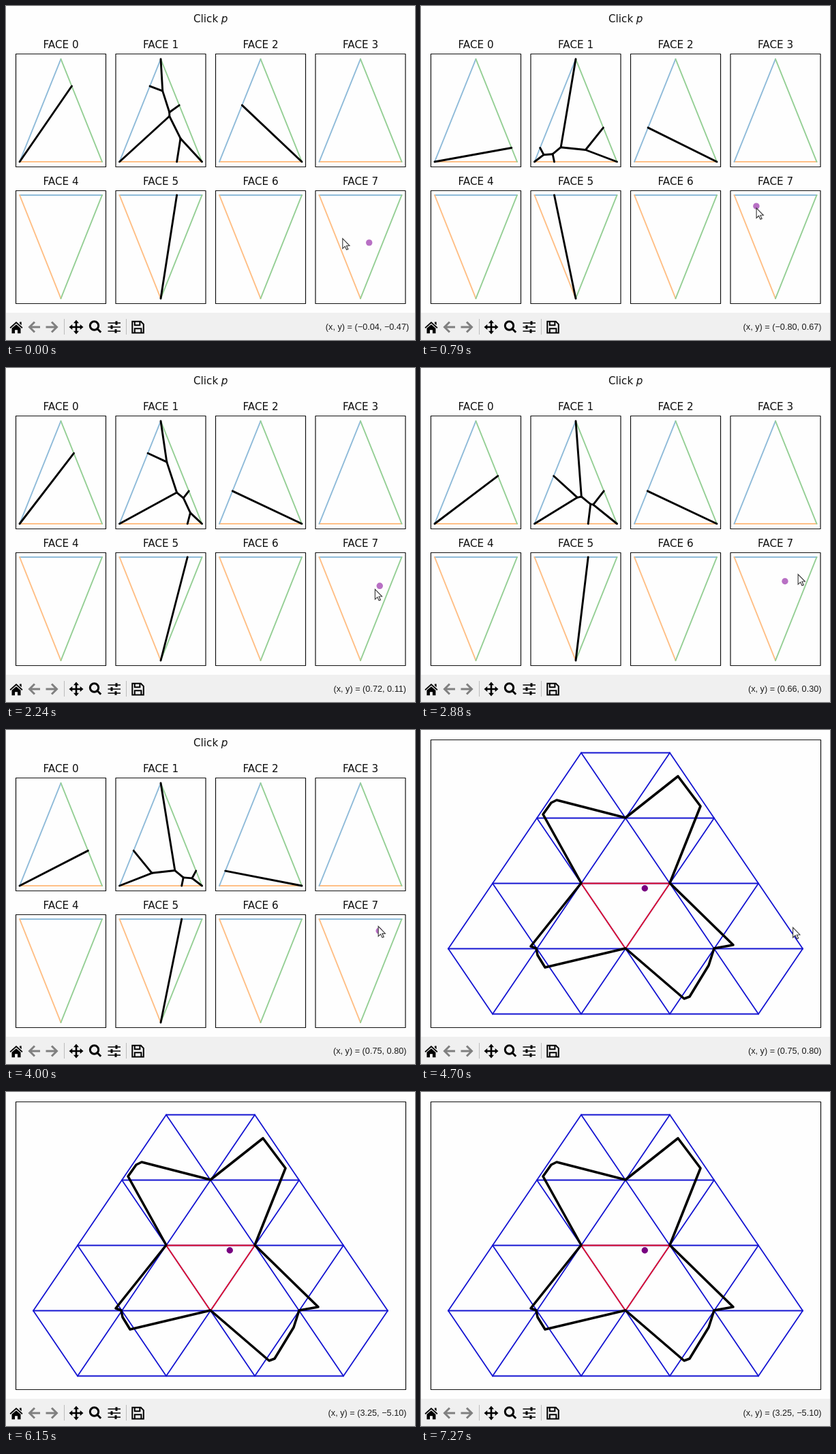
An HTML page with a canvas that plays this animation: 600 by 491 pixels, repeating every 7300 ms.

```html
<!DOCTYPE html>
<html lang="en">
<head>
<meta charset="utf-8">
<title>Cut locus on an octahedron</title>
<style>
html, body { margin: 0; width: 100%; height: 100%; overflow: hidden; background: #fefefe; }
canvas { display: block; }
</style>
</head>
<body>
<canvas id="stage" width="600" height="491"></canvas>
<script>
const ctx = document.getElementById('stage').getContext('2d');
const LOOP = 7300, STEP = 20, CLICK = 4640, MOVE = 5130, LEAVE = 5600, GONE = 5680;
const TEXT_LAG = 50, POINT_LAG = 100;
const R3 = Math.sqrt(3), H = R3 / 2;
const BLUE = '#8fbbd9', GREEN = '#95cf95', ORANGE = '#ffbf86';

// Pointer paths: time, x, y in the axes' units
const facePath = [
  [-100, .365, -.38], [-50, -.04, -.47], [0, -.75, -.25], [250, -1.05, .25],
  [700, -.8, .68], [1150, -.85, .15], [1480, -.28, .34], [1530, .04, .43],
  [1580, .3, .45], [1850, 1.1, .6], [2200, .7, .1], [2520, -.1, .1],
  [2780, .4, .3], [2830, .66, .3], [2880, .95, .51], [3200, 1.3, .75],
  [3600, .95, .5], [3900, .78, .66], [3950, .75, .8], [4000, .75, .8], [CLICK, .75, .8]
];
const netPath = [
  [5100, 6.55, -1.03], [5350, 5, -3.2], [LEAVE, 3.25, -5.1], [5700, 2.9, -5.8]
];

const add = (a, b) => [a[0] + b[0], a[1] + b[1]];
const sub = (a, b) => [a[0] - b[0], a[1] - b[1]];
const mul = (a, k) => [a[0] * k, a[1] * k];
const dot = (a, b) => a[0] * b[0] + a[1] * b[1];
const cross = (a, b) => a[0] * b[1] - a[1] * b[0];
const lerp = (a, b, u) => add(mul(a, 1 - u), mul(b, u));
// Third corner of the triangle unfolded over edge ab, away from c
const flip = (a, b, c) => sub(add(a, b), c);

// Smooth curve through timed keys
function follow(keys, t) {
  const last = keys.length - 1;
  t = Math.min(Math.max(t, keys[0][0]), keys[last][0]);
  let i = 0;
  while (i < last - 1 && keys[i + 1][0] < t) i++;
  const h = keys[i + 1][0] - keys[i][0], s = (t - keys[i][0]) / h;
  const slope = (j, k) => {
    const a = keys[Math.max(j - 1, 0)], b = keys[Math.min(j + 1, last)];
    return (b[k] - a[k]) / (b[0] - a[0]);
  };
  return [1, 2].map(k =>
    keys[i][k] * (1 + 2 * s) * (1 - s) ** 2 + keys[i + 1][k] * s * s * (3 - 2 * s) +
    h * s * (1 - s) * (slope(i, k) * (1 - s) - slope(i + 1, k) * s));
}

const facePx = ([x, y]) => [520 + 34.9 * x, 278 + 50.67 * (1 - y)];
const netPx = ([x, y]) => [300 + 37.5 * x, 225 + 32 * (1 - y)];

function line(points, color, width, closed) {
  ctx.beginPath();
  points.forEach(p => ctx.lineTo(...p));
  if (closed) ctx.closePath();
  ctx.strokeStyle = color;
  ctx.lineWidth = width;
  ctx.stroke();
}

function disc([x, y], color) {
  ctx.fillStyle = color;
  ctx.beginPath();
  ctx.arc(x, y, 4.7, 0, 7);
  ctx.fill();
}

function text(str, x, y, font, color = '#111', align = 'center') {
  ctx.font = font;
  ctx.fillStyle = color;
  ctx.textAlign = align;
  ctx.fillText(str, x, y);
}

function box(x, y, w, h) {
  ctx.strokeStyle = '#111';
  ctx.lineWidth = 1.2;
  ctx.strokeRect(x, y, w, h);
}

// Corners of a panel's triangle: left, right, apex
function corners(i) {
  const x = 20 + 146.5 * (i % 4), base = i < 4 ? 229 : 278, apex = i < 4 ? 78 : 430;
  return [[x, base], [x + 121, base], [x + 60.5, apex]];
}

function panel(i) {
  const [l, r, a] = corners(i), up = i < 4;
  line([l, r], up ? ORANGE : BLUE, 2);
  line([l, a], up ? BLUE : ORANGE, 2);
  line([r, a], GREEN, 2);
  box(l[0] - 5.5, up ? 70.5 : 271.5, 132, 166);
  text('FACE ' + i, a[0], up ? 62 : 263, '15.2px "DejaVu Sans", sans-serif');
}

// The face opposite the point, and its three neighbours:
// far corner's index, shared edge, panel, panel corners for the line
const F = [[0, 0], [1, 0], [.5, H]];
const neighbours = [
  { c: 1, a: 0, b: 2, face: 0, from: 0, to: [1, 2] },
  { c: 0, a: 1, b: 2, face: 2, from: 1, to: [0, 2] },
  { c: 2, a: 0, b: 1, face: 5, from: 2, to: [0, 1] }
];

// Image of the point, unfolded into the plane of the opposite face
function image(w, a, b, c) {
  const v = flip(F[a], F[b], F[c]), n = flip(v, F[a], F[b]), m = flip(v, n, F[a]);
  return add(add(mul(v, w[c]), mul(n, w[b])), mul(m, w[a]));
}

// The piece of the bisector of sites i and j that belongs to the Voronoi diagram
function bisector(sites, i, j) {
  const p = sites[i], q = sites[j], mid = lerp(p, q, .5);
  const d = [p[1] - q[1], q[0] - p[0]];
  let lo = -99, hi = 99;
  const clip = (normal, limit) => {
    const k = dot(normal, d), room = limit - dot(normal, mid);
    if (Math.abs(k) < 1e-9) { if (room < 0) hi = -100; }
    else if (k > 0) hi = Math.min(hi, room / k);
    else lo = Math.max(lo, room / k);
  };
  sites.forEach((s, k) => {
    if (k !== i && k !== j) clip(sub(s, p), (dot(s, s) - dot(p, p)) / 2);
  });
  clip([0, -1], 0);
  clip([-R3, 1], 0);
  clip([R3, 1], R3);
  return hi - lo > 1e-6 ? [lo, hi].map(s => add(mid, mul(d, s))) : null;
}

function cutLocus([x, y]) {
  const bottom = (1 - y) / 3, right = (1 - bottom + x / R3) / 2;
  const w = [1 - bottom - right, right, bottom];
  const sites = [];
  for (const { a, b, c, face, from, to } of neighbours) {
    const p = image(w, a, b, c), q = image(w, b, a, c);
    sites.push(p, q);
    const v = flip(F[a], F[b], F[c]), d = sub(lerp(p, q, .5), v);
    const u = cross(sub(v, F[a]), d) / cross(sub(F[b], F[a]), d);
    const k = corners(face);
    line([k[from], lerp(k[to[0]], k[to[1]], u)], '#000', 2.9);
  }
  const [l] = corners(1);
  for (let i = 0; i < 6; i++) for (let j = i + 1; j < 6; j++) {
    const seg = bisector(sites, i, j);
    if (seg) line(seg.map(s => [l[0] + 121 * s[0], l[1] - 151 * s[1] / H]), '#000', 2.9);
  }
}

function faces(t) {
  text('Click ', 275, 24, '15.2px "DejaVu Sans", sans-serif', '#111', 'left');
  text('p', 315.8, 24, 'italic 15.2px "DejaVu Sans", sans-serif', '#111', 'left');
  for (let i = 0; i < 8; i++) panel(i);
  const p = follow(facePath, t - POINT_LAG);
  cutLocus(p);
  disc(facePx(p), '#b870c4');
}

const locus = [
  [235, 225], [179, 124], [191, 107], [199, 103], [300, 129], [377, 68], [410, 112],
  [365, 225], [458, 316], [430, 321], [422, 346], [394, 392], [386, 395], [300, 321],
  [182, 349], [171, 331], [169, 321], [161, 318]
];

function net() {
  const node = (col, row) => [235 + 130 * col - 65 * row, 33.5 + 96 * row];
  const blue = (...ends) => line(ends, '#1414d2', 1.8);
  for (let r = 0; r < 5; r++) {
    const first = r === 4 ? 1 : 0, count = r === 4 ? 4 : r + 2;
    blue(node(first, r), node(first + count - 1, r));
  }
  for (let c = 0; c < 5; c++) {
    blue(node(c, Math.max(c - 1, 0)), node(c, c ? 4 : 3));
    blue(node(0, c), node(4 - c, 4));
  }
  blue(node(1, 0), node(4, 3));
  line([[235, 225.5], [365, 225.5], [300, 321.5]], '#e8142c', 1.8, true);
  line(locus, '#000', 3.6, true);
  disc([328.3, 232.7], '#780080');
  box(14.5, 14.5, 572, 423);
}

const icons = {
  home: new Path2D('M5.5 472.6 15 464l9.5 8.6-1.2 1.3L15 466.6l-8.3 7.3zM8.5 473.8 15 468.2l6.5 5.6v7.4H17v-5h-4v5H8.5zM20 464.5h2.7v4.7L20 466.8z'),
  arrows: new Path2D('M50 472H35M42 464.5 34.5 472l7.5 7.5M58.5 472H74M67 464.5l7.5 7.5-7.5 7.5'),
  cross: new Path2D('M103 464v16M95 472h16'),
  heads: new Path2D('M103 461.5l4 4.8h-8zM103 482.5l4-4.8h-8zM92.5 472l4.8-4v8zM113.5 472l-4.8-4v8z'),
  lens: new Path2D('M135.7 470a6.2 6.2 0 1 1-12.4 0 6.2 6.2 0 1 1 12.4 0M134.5 475l4.7 4.7'),
  sliders: new Path2D('M149.5 466H168M149.5 472H168M149.5 478H168'),
  knobs: new Path2D('M160.5 463.3h3v5.4h-3zM153.5 469.3h3v5.4h-3zM159.5 475.3h3v5.4h-3z'),
  disk: new Path2D('M185.3 463.8h12.5l4 4v12.7h-16.5zM188.8 464v5.2h7.6V464M188.8 480.5v-6.3h9.6v6.3'),
  bars: new Path2D('M85.5 460v23M176.5 460v23'),
  pointer: new Path2D('M0 .5v14.7l3.4-3.2L5.8 17l2.3-.9-2.4-4.9 4.5-.2z')
};

function label(t) {
  const [x, y] = t < MOVE ? follow(facePath, t) : follow(netPath, Math.min(t, LEAVE));
  const num = v => v.toFixed(2).replace('-', '\u2212');
  return `(x, y) = (${num(x)}, ${num(y)})`;
}

function toolbar(t) {
  const draw = (name, width, color = '#000') => {
    ctx.strokeStyle = color;
    ctx.lineWidth = width;
    ctx.stroke(icons[name]);
  };
  ctx.fillStyle = '#f0f0f0';
  ctx.fillRect(0, 451, 600, 40);
  ctx.fillStyle = '#000';
  for (const name of ['home', 'heads', 'knobs']) ctx.fill(icons[name]);
  draw('arrows', 3, '#808080');
  draw('cross', 2.6);
  draw('lens', 3);
  draw('sliders', 1.7);
  draw('disk', 2);
  draw('bars', 1, '#bcbcbc');

  // The label's slot keeps the width of the text shown just before
  const font = '12.7px "Liberation Sans", Arial, sans-serif';
  ctx.font = font;
  const slot = ctx.measureText(label(t - TEXT_LAG - 30)).width;
  text(label(t - TEXT_LAG), 587.5 - slot / 2, 476, font, '#1c1c1c');
}

function pointer(t) {
  if (t > GONE) return;
  const [x, y] = t < CLICK ? facePx(follow(facePath, t)) : netPx(follow(netPath, t));
  ctx.save();
  ctx.translate(x, y);
  ctx.fillStyle = '#fff';
  ctx.fill(icons.pointer);
  ctx.strokeStyle = '#333';
  ctx.lineWidth = 1.1;
  ctx.stroke(icons.pointer);
  ctx.restore();
}

function frame(now) {
  const t = Math.floor(now % LOOP / STEP) * STEP;
  ctx.fillStyle = '#fefefe';
  ctx.fillRect(0, 0, 600, 491);
  ctx.lineCap = ctx.lineJoin = 'round';
  if (t < CLICK) faces(t); else net();
  ctx.lineCap = 'butt';
  ctx.lineJoin = 'miter';
  toolbar(t);
  pointer(t);
  requestAnimationFrame(frame);
}
requestAnimationFrame(frame);
</script>
</body>
</html>
```
